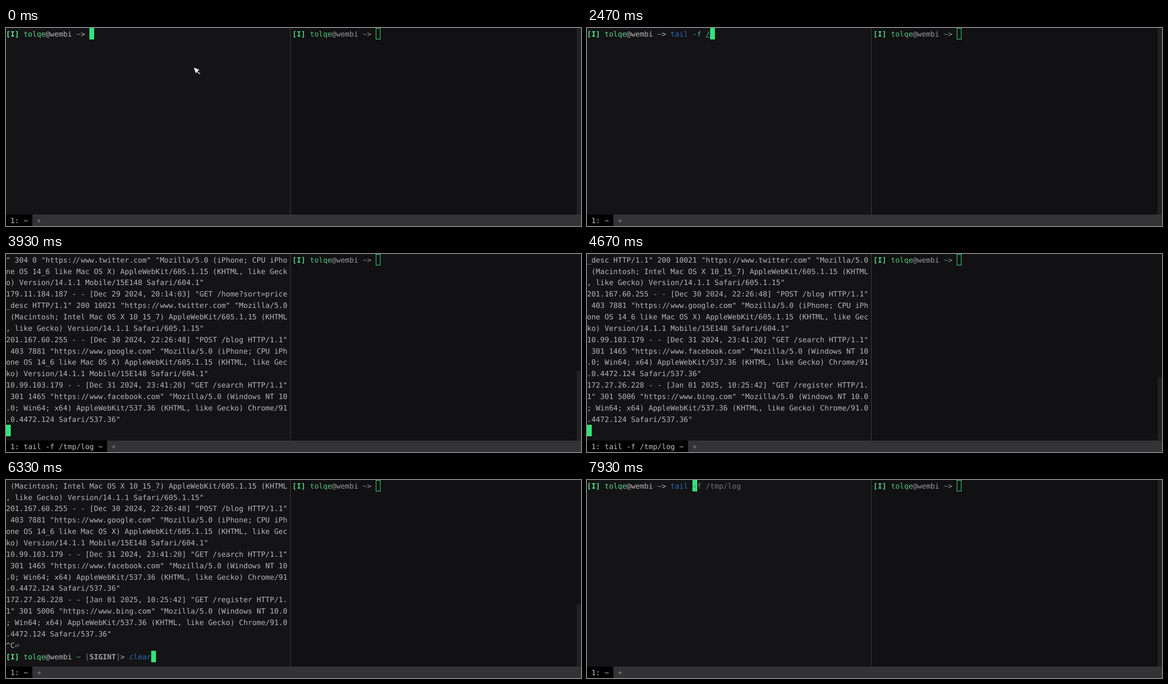
Animation, 1200 px wide and 415 px high, one loop 8 s. Source, as an HTML page with a canvas:

```html
<!DOCTYPE html>
<html lang="en">
<head>
<meta charset="utf-8">
<title>Terminal</title>
<style>
  html, body { margin: 0; width: 100%; height: 100%; overflow: hidden; background: #141315; }
  canvas { display: block; }
</style>
</head>
<body>
<canvas id="stage" width="1200" height="415"></canvas>
<script>
const ctx = document.getElementById('stage').getContext('2d');
const LOOP = 8000, CELL = 9.175, ROW = 23.86, COLS = 64, ROWS = 16;
const BAR_Y = 391, RIGHT_X = 597.5;
const FONT = '15.24px "DejaVu Sans Mono", "Noto Sans Mono", monospace';
const USER = 'tolqe', HOST = 'wembi';

const BRIGHT = {
  mode: '#58e08c', user: '#58d488', host: '#b9b8ba', path: '#5aa87a', cursor: '#33e27c'
};
const DIM = {
  mode: '#52cd82', user: '#52c37d', host: '#99989a', path: '#50966d', cursor: '#38c874'
};
const GREY = '#b6b5b7', BLUE = '#2c6bb0', CYAN = '#459fa8', RED = '#cf4f50', GHOST = '#747376';

const agents = {
  iphone: '"Mozilla/5.0 (iPhone; CPU iPhone OS 14_6 like Mac OS X) AppleWebKit/605.1.15 (KHTML, like Gecko) Version/14.1.1 Mobile/15E148 Safari/604.1"',
  mac: '"Mozilla/5.0 (Macintosh; Intel Mac OS X 10_15_7) AppleWebKit/605.1.15 (KHTML, like Gecko) Version/14.1.1 Safari/605.1.15"',
  windows: '"Mozilla/5.0 (Windows NT 10.0; Win64; x64) AppleWebKit/537.36 (KHTML, like Gecko) Chrome/91.0.4472.124 Safari/537.36"'
};
const entry = (head, site, agent) => `${head} "https://www.${site}.com" ${agents[agent]}`;
const wrap = text => text.match(new RegExp(`.{1,${COLS}}`, 'g'));

const firstLog = [
  entry('" 304 0', 'twitter', 'iphone'),
  entry('179.11.184.187 - - [Dec 29 2024, 20:14:03] "GET /home?sort=price_desc HTTP/1.1" 200 10021', 'twitter', 'mac'),
  entry('201.167.60.255 - - [Dec 30 2024, 22:26:48] "POST /blog HTTP/1.1" 403 7881', 'google', 'iphone'),
  entry('10.99.103.179 - - [Dec 31 2024, 23:41:20] "GET /search HTTP/1.1" 301 1465', 'facebook', 'windows')
].flatMap(wrap);
const laterLog = firstLog.concat(wrap(
  entry('172.27.26.228 - - [Jan 01 2025, 10:25:42] "GET /register HTTP/1.1" 301 5006', 'bing', 'windows')));

const TAIL = 'tail -f /tmp/log';
const tailKeys = [870, 1270, 1330, 1400, 1470, 1930, 2000, 2200,
                  2330, 2530, 2670, 2800, 2930, 3070, 3130, 3200];
const clearKeys = [5870, 5930, 6070, 6130, 6200];
const againKeys = [7470, 7600, 7670, 7730, 7870];
const RUN = 3600, NEW_ENTRY = 4200, INTERRUPT = 5600, CLEARED = 6400;

const typed = (keys, t) => keys.filter(k => k <= t).length;

function rect(x, y, w, h, color) {
  ctx.fillStyle = color;
  ctx.fillRect(x, y, w, h);
}

// Writes on the cell grid and returns the next free column.
function put(text, col, y, color, { x = 0, bold = false } = {}) {
  ctx.font = (bold ? 'bold ' : '') + FONT;
  ctx.fillStyle = color;
  [...text].forEach((ch, i) => {
    // Paired slashes sit closer together.
    const nudge = ch !== '/' ? 0 : text[i + 1] === '/' ? 1.2 : text[i - 1] === '/' ? -1.2 : 0;
    ctx.fillText(ch, x + (col + i) * CELL + nudge, y + 17.7);
  });
  return col + [...text].length;
}

function prompt(y, palette, x = 0, interrupted = false) {
  let col = put('[I]', 0, y, palette.mode, { x, bold: true });
  col = put(USER, col + 1, y, palette.user, { x });
  col = put('@' + HOST, col, y, palette.host, { x });
  col = put('~', col + 1, y, palette.path, { x });
  if (interrupted) {
    col = put('[', col + 1, y, '#777679');
    col = put('SIGINT', col, y, '#a3a2a4', { bold: true });
    col = put(']', col, y, '#777679');
  }
  return put('>', col, y, palette.host, { x }) + 1;
}

function cursor(col, y, under = '') {
  rect(Math.round(col * CELL), Math.round(y), 10, 24, BRIGHT.cursor);
  put(under, col, y, '#1c6b40');
}

// Draws a command line with syntax colours, an optional suggestion and the cursor.
function commandLine(command, count, col, y, suggest = false) {
  const text = command.slice(0, count);
  const name = command.split(' ')[0];
  put(text.slice(0, name.length), col, y, count < name.length ? RED : BLUE);
  put(text.slice(name.length), col + name.length, y, CYAN);
  const pathAt = command.indexOf('/');
  if (pathAt >= 0 && count > pathAt) {
    rect((col + pathAt) * CELL, y + 19, (count - pathAt) * CELL, 1, CYAN);
  }
  const rest = suggest && count ? command.slice(count) : '';
  put(rest.slice(1), col + count + 1, y, GHOST);
  cursor(col + count, y, rest.slice(0, 1));
}

function pointer() {
  ctx.fillStyle = '#fff';
  ctx.fill(new Path2D('M392 83 L404 88 L399 90 L405.5 96 L404.5 97 L398 91.5 L396.5 95.5 Z'));
}

function frame(title, totalRows) {
  rect(0, 0, 593, BAR_Y, '#141315');
  rect(593, 0, 607, BAR_Y, '#111012');
  rect(593, 0, 1, BAR_Y, '#454447');
  const thumb = BAR_Y * ROWS / totalRows;
  rect(1191, BAR_Y - thumb, 9, thumb, '#222124');

  rect(0, BAR_Y, 1200, 24, '#333235');
  const tab = ` 1: ${title} `;
  rect(0, BAR_Y, Math.round(tab.length * CELL), 24, '#000');
  put(tab, 0, BAR_Y, '#bdbcbe');
  put('+', tab.length + 1, BAR_Y, '#858487');

  const col = prompt(0, DIM, RIGHT_X);
  ctx.strokeStyle = DIM.cursor;
  ctx.lineWidth = 1.3;
  ctx.strokeRect(Math.round(RIGHT_X + col * CELL) + 0.3, 0.6, 8.7, 22.8);
}

function draw(t) {
  const tailing = t >= RUN && t < INTERRUPT;
  const stopped = t >= INTERRUPT && t < CLEARED;
  const lastY = (ROWS - 1) * ROW;
  frame(tailing ? TAIL + ' ~' : '~', tailing ? (t < NEW_ENTRY ? 43 : 47) : stopped ? 48 : ROWS);

  if (tailing || stopped) {
    const log = t < NEW_ENTRY ? firstLog : stopped ? [...laterLog, '^C⏎'] : laterLog;
    log.slice(1 - ROWS).forEach((line, i) => put(line, 0, i * ROW, GREY));
    if (tailing) cursor(0, lastY);
    else commandLine('clear', typed(clearKeys, t), prompt(lastY, BRIGHT, 0, true), lastY);
    return;
  }

  const again = t >= CLEARED;
  const count = typed(again ? againKeys : tailKeys, t);
  commandLine(TAIL, count, prompt(0, BRIGHT), 0, again);
  if (t < tailKeys[0]) pointer();
}

ctx.textRendering = 'geometricPrecision';
function tick() {
  draw(performance.now() % LOOP);
  requestAnimationFrame(tick);
}
tick();
</script>
</body>
</html>
```
